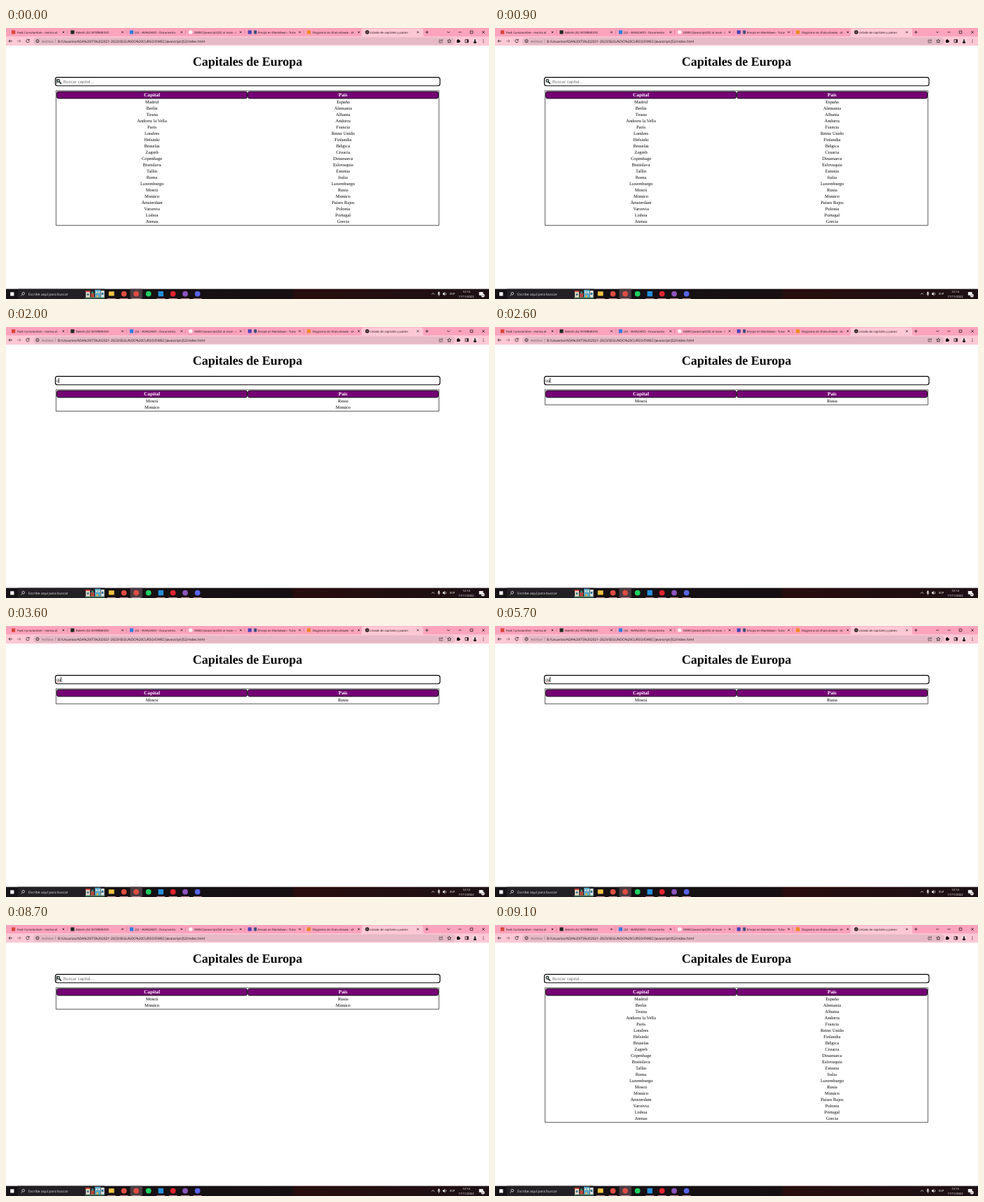
An HTML page for the animation above (9200 ms loop, 690x388 px).

```html
<!DOCTYPE html>
<html lang="es">
<head>
<meta charset="utf-8">
<title>Listado de capitales y países</title>
<style>
  html, body { margin: 0; width: 100%; height: 100%; overflow: hidden; background: #fff; }
  svg { display: block; width: 690px; height: 388px; text-rendering: geometricPrecision; }
  .ui { font-family: "Open Sans", "Noto Sans", sans-serif; }
  .serif { font-family: "Liberation Serif", "Times New Roman", serif; }
  .field { font: 6.1px "Liberation Sans", Arial, sans-serif; }
  .mid { text-anchor: middle; }
  .line { fill: none; stroke: #1f1418; stroke-width: .75; }
</style>
</head>
<body>
<svg id="stage" viewBox="0 0 690 388" xmlns="http://www.w3.org/2000/svg">
  <defs>
    <linearGradient id="bar">
      <stop offset="0" stop-color="#151317"/>
      <stop offset=".59" stop-color="#160f11"/>
      <stop offset=".6" stop-color="#280d0d"/>
      <stop offset=".85" stop-color="#210f12"/>
      <stop offset="1" stop-color="#1d1115"/>
    </linearGradient>
    <linearGradient id="fade">
      <stop offset=".6" stop-color="#fca3bd" stop-opacity="0"/>
      <stop offset="1" stop-color="#fca3bd"/>
    </linearGradient>
  </defs>
  <rect width="690" height="388" fill="#fff"/>
  <g id="browser" class="ui"></g>
  <g id="page" class="serif">
    <text class="mid" x="345" y="54.4" font-size="18" font-weight="700">Capitales de Europa</text>
    <rect x="70.5" y="70.6" width="549.5" height="12.2" rx="3" fill="#fff" stroke="#000" stroke-width="1.15"/>
    <g id="hint">
      <path d="M76.2 77l2.2 2.3" stroke="#14211c" stroke-width="1.7" stroke-linecap="round"/>
      <circle cx="74.8" cy="75.5" r="1.9" fill="#c4ddd5" stroke="#14211c" stroke-width="1.1"/>
      <text class="field" x="82" y="79" fill="#757575">Buscar capital...</text>
    </g>
    <text id="typed" class="field" x="72" y="79"></text>
    <path id="squiggle" d="M72 80.6l1-.8 1 .8 1-.8 1 .8 1-.8 1 .8" fill="none" stroke="#e0302a" stroke-width=".6"/>
    <rect id="caret" y="73" width=".8" height="7" fill="#000"/>
    <rect id="frame" x="71.5" y="89.9" width="547" fill="none" stroke="#3c3c3c" stroke-width=".8"/>
    <g id="rows" class="mid" font-size="6.46"></g>
  </g>
  <g id="taskbar" class="ui"></g>
</svg>
<script>
const LOOP = 9200;
const $ = id => document.getElementById(id);
const text = (x, y, size, s, fill = '#222', cls = '') =>
  `<text x="${x}" y="${y}" font-size="${size}" fill="${fill}" class="${cls}">${s}</text>`;
const rect = (x, y, w, h, fill, rx = 0) =>
  `<rect x="${x}" y="${y}" width="${w}" height="${h}" rx="${rx}" fill="${fill}"/>`;
const dot = (x, y, r, fill) => `<circle cx="${x}" cy="${y}" r="${r}" fill="${fill}"/>`;
const line = (d, extra = '') => `<path class="line" d="${d}" ${extra}/>`;
const cross = (x, y, r) => line(`M${x - r} ${y - r}l${2 * r} ${2 * r}m0 ${-2 * r}l${-2 * r} ${2 * r}`);

// Browser window
const tabs = [
  ['Fwd: Cursolumbre - marisa.ol', '#d9453a', 16],
  ['Boletín JS2 INTERMEDIO', '#1b2a21', 100],
  ['JS2 - AVANZADO - Documento', '#2f7de1', 184.3],
  ['DWEC/Javascript/JS2 at main · r', '#fff3f6', 269],
  ['Emojis en Markdown - Tutor', '#4b41b8', 360],
  ['Diagrama sin título.drawio - dr', '#ef8a1d', 438],
  ['Listado de capitales y países', '', 519.5]
];

function drawBrowser() {
  let s = rect(0, 0, 690, 13, '#fca3bd') + rect(0, 12, 690, 13.3, '#fdc8d5') +
    '<path d="M505 12.5q3 0 3-3v-6q0-3 3-3h82q3 0 3 3v6q0 3 3 3z" fill="#fdc8d5"/>';
  tabs.forEach(([name, color, x], i) => {
    const left = 4 + i * 84.4, last = i === tabs.length - 1;
    s += text(x, 7.6, 4.2, name, '#1d0f14');
    if (last) {
      s += dot(516, 6, 2.7, '#0d0b0c') + line('M513.8 6h4.4M516 3.8v4.4', 'style="stroke:#f3c3d0;stroke-width:.45"');
    } else {
      s += rect(left + 64, 2, 11, 9, 'url(#fade)') + rect(left + 75, 2, 6, 9, '#fca3bd');
      s += i === 3 ? dot(left + 6.5, 6, 2.8, color) : rect(left + 4, 3.4, 5.2, 5.2, color);
      if (i < 5) s += rect(left + 83.6, 3, .5, 6, '#b9707f');
    }
    s += cross(left + 78, 6, 1.3);
  });
  s += rect(354.2, 3.6, 4, 4.8, '#35507c', .6);
  // Window controls
  s += line('M601.3 3.8v4.4m-2.2-2.2h4.4M630.2 5l2 2 2-2M646.5 6h4M663.2 4.2h3.6v3.6h-3.6z') + cross(682, 6, 1.8);
  // Toolbar
  s += rect(39, 13.6, 603, 10.4, '#e5bac6', 5.2) +
    line('M9 18.7h-5m2.2-2.2l-2.2 2.2 2.2 2.2') +
    line('M16 18.7h5m-2.2-2.2l2.2 2.2-2.2 2.2', 'opacity=".5"') +
    line('M33 17.3a2.3 2.3 0 1 0 .3 1.8M33.2 15.8v1.9h-1.9') +
    `<circle class="line" cx="45" cy="18.7" r="2.1"/>` + line('M45 18.4v1.3M45 17.3v.5') +
    text(51, 20.5, 4.8, 'Archivo', '#66525a') + rect(70.6, 16.3, .5, 5, '#8f707a') +
    text(74, 20.5, 4.84, 'B:/Usuarios/ADA%20ITS%202021-2023/SEGUNDO%20CURSO/DWEC/Javascript/JS2/index.html', '#1a1114') +
    line('M621 17h-2v4h4.3v-1.5M620.5 19.3q.3-2 3-2m-1.2-1.3l1.5 1.3-1.5 1.3', 'opacity=".7"') +
    line('M633.3 16.1l.8 1.7 1.9.2-1.4 1.3.4 1.9-1.7-1-1.7 1 .4-1.9-1.4-1.3 1.9-.2z') +
    rect(644, 17, 4, 4, '#140c0f', .5) + dot(646, 16.8, .9, '#140c0f') + dot(648.2, 19, .9, '#140c0f') +
    line('M656 16.6h4.4v4.2h-4.4z') + rect(658.6, 16.6, 1.8, 4.2, '#140c0f') +
    dot(670, 18.7, 3.3, '#f1e4e6') + dot(670, 17.5, 1.2, '#20161a') +
    '<path d="M667.6 21q.4-2.3 2.4-2.3t2.4 2.3q-2.4 1.8-4.8 0z" fill="#20161a"/>' +
    [16.8, 18.7, 20.6].map(y => dot(682, y, .55, '#1f1418')).join('');
  $('browser').innerHTML = s;
}

// Windows taskbar
function drawTaskbar() {
  const light = 'style="stroke:#f4f0f2"';
  let s = rect(0, 373.6, 690, 14.4, 'url(#bar)') + rect(6.2, 378.3, 5.2, 5.2, '#fff') +
    rect(17, 373.6, 124, 14.4, '#232025') +
    `<circle class="line" cx="24.7" cy="380.2" r="1.8" ${light}/>` + line('M23.4 381.6l-1.8 1.9', light) +
    text(32, 382.6, 4.98, 'Escribe aquí para buscar', '#e4e0e3');
  // Little street scene
  s += rect(114, 377, 6, 9, '#e9d9c4') + rect(113.5, 376, 7, 2, '#c8443b') + rect(115.5, 380, 3, 3, '#4a7f92') +
    rect(121, 380, 5, 6, '#b9473c') + dot(123.5, 379, 1.7, '#3d8c73') +
    rect(127, 374.8, 8, 11.2, '#5aa9c7') + rect(128.5, 377, 2, 2.5, '#f3e8cf') + rect(132, 377, 2, 2.5, '#f3e8cf') +
    rect(135.5, 376, 5, 10, '#d8e3e4') + rect(136.5, 379, 2.6, 3, '#2f6f8e') +
    rect(113, 385.6, 28, 1.6, '#467b60') + dot(130.5, 384, 1.5, '#e5b34b');
  s += rect(177.4, 373.6, 17.4, 14.4, '#4a3b41') + rect(146.8, 377.3, 7.8, 6.2, '#f2c443', .5);
  [[168.5, '#df4d40'], [186, '#df4d40'], [203.6, '#1ed05f'], [238.6, '#e3242f'], [256, '#8d55bd'], [273.6, '#5865e8']]
    .forEach(([x, c]) => s += dot(x, 380.6, 3.9, c));
  s += rect(217.5, 376.9, 7.4, 7.4, '#2590dc');
  [150.7, 168.5, 186, 221.2, 238.6, 256, 273.6].forEach(x => s += rect(x - 6, 387.1, 12, .9, '#d897a7'));
  // Tray
  s += line('M608 381.6l2-2 2 2', light) +
    rect(617.4, 377.4, 2, 4, '#f4f0f2', 1) + line('M616.6 380.8q1.8 2.6 3.6 0M618.4 382.2v1.6', light) +
    '<path d="M624 379.5h1.2l1.6-1.6v5.4l-1.6-1.6h-1.2z" fill="#f4f0f2"/>' + line('M628 378.8q1.4 1.8 0 3.6', light) +
    text(634, 382.2, 4.2, 'ESP', '#fff') +
    '<text id="clock" class="mid" x="657.5" y="379.4" font-size="4.2" fill="#fff"></text>' +
    text(657.5, 386, 4.2, '17/11/2022', '#fff', 'mid') +
    rect(675.8, 378, 5.8, 4.8, '#f4f0f2', .4) + dot(681.3, 383, 2.5, '#f4f0f2') +
    text(681.3, 384.2, 3, '22', '#222', 'mid');
  $('taskbar').innerHTML = s;
}

const list = `Madrid/España,Berlín/Alemania,Tirana/Albania,Andorra la Vella/Andorra,París/Francia,
Londres/Reino Unido,Helsinki/Finlandia,Bruselas/Bélgica,Zagreb/Croacia,Copenhage/Dinamarca,
Bratislava/Eslovaquia,Tallin/Estonia,Roma/Italia,Luxemburgo/Luxemburgo,Moscú/Rusia,
Monáco/Monáco,Ámsterdam/Países Bajos,Varsovia/Polonia,Lisboa/Portugal,Atenas/Grecia`
  .split(',').map(s => s.trim().split('/'));
const columns = [208.5, 481.5];

function drawHeader() {
  $('frame').insertAdjacentHTML('afterend', ['Capital', 'País'].map((name, i) =>
    `<rect x="${72.7 + i * 273}" y="91.1" width="271.8" height="9.8" rx="2.2" fill="#740074" stroke="#0c000c" stroke-width=".9"/>` +
    `<text class="mid" x="${columns[i]}" y="98.1" font-size="7.2" font-weight="700" fill="#fff">${name}</text>`).join(''));
}

function drawRows(query) {
  const hits = list.filter(([capital]) => capital.includes(query));
  $('frame').setAttribute('height', 12.6 + 9 * hits.length);
  $('rows').innerHTML = hits.map((row, i) =>
    row.map((s, c) => text(columns[c], 108.2 + 9 * i, 6.46, s, '#000')).join('')).join('');
}

// Step tables: [start ms, value]
const typing = [[0, ''], [1600, 'c'], [2500, 'cú'], [8200, 'c'], [8600, '']];
const filter = [[0, ''], [1900, 'c'], [2600, 'cú'], [8300, 'c'], [8800, '']];
const clock = [[0, '12:14'], [8900, '12:15']];
const spelling = [[0, false], [3500, true], [8200, false]];
const blink = [0, 600, 1100, 2100, 2500, 3000, 3500, 4100, 4600, 5200, 5700, 6200, 6800, 7300, 7800, 9100]
  .map((t, i) => [t, i % 2 === 0]);
const at = (steps, t) => steps.filter(s => s[0] <= t).pop()[1];
const caretX = { '': 71.9, c: 75.1, 'cú': 78.4 };
const show = (id, on) => $(id).style.display = on ? '' : 'none';

let query = null;
function render(now) {
  const t = now % LOOP, typed = at(typing, t), wanted = at(filter, t);
  if (wanted !== query) drawRows(query = wanted);
  $('typed').textContent = typed;
  $('clock').textContent = at(clock, t);
  $('caret').setAttribute('x', caretX[typed]);
  show('caret', at(blink, t));
  show('hint', !typed);
  show('squiggle', at(spelling, t));
}

drawBrowser();
drawTaskbar();
drawHeader();
const start = performance.now();
(function tick() {
  render(performance.now() - start);
  requestAnimationFrame(tick);
})();
</script>
</body>
</html>
```
